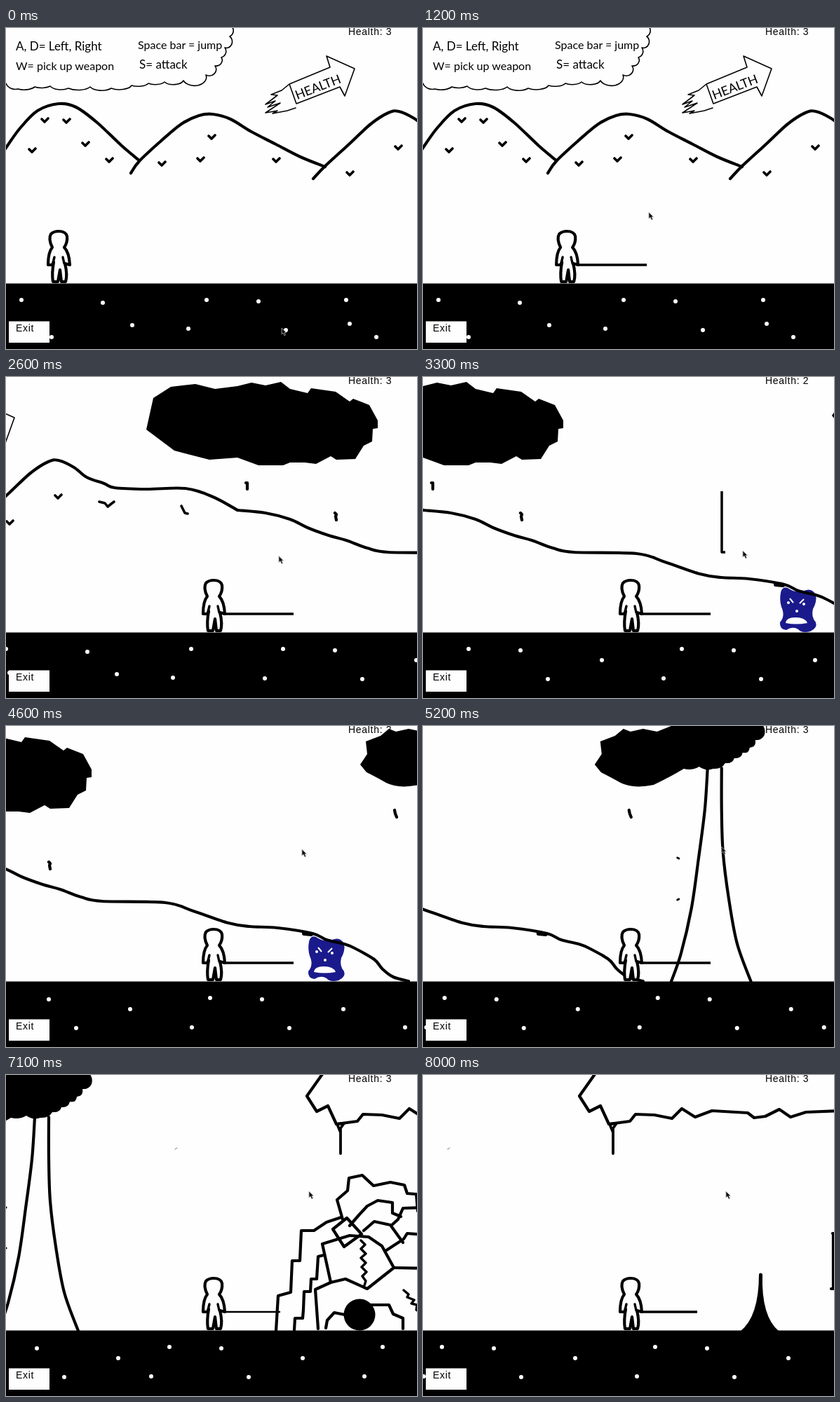
An HTML page that plays this animation: 586 by 458 pixels, repeating every 8100 ms.

```html
<!DOCTYPE html>
<html lang="en">
<head>
<meta charset="utf-8">
<title>Side-scrolling game</title>
<style>
html, body { margin: 0; width: 100%; height: 100%; overflow: hidden; background: #fefefe; }
svg { display: block; width: 586px; height: 458px; }
.ink { fill: none; stroke: #000; stroke-width: 4.2; stroke-linecap: round; stroke-linejoin: round; }
.thin { stroke-width: 1.6; }
.fill { fill: #000; }
.hand { font: 17px Lato, "Open Sans", sans-serif; }
.ui { font: 14px "Liberation Sans", Arial, sans-serif; letter-spacing: .7px; white-space: pre; }
</style>
</head>
<body>
<svg viewBox="0 0 586 458">
  <g id="world">
    <!-- start: hills and instructions -->
    <g class="ink">
      <path class="thin" d="M0 79a14 12 0 0 0 17 8a18 9 0 0 0 24-3a16 7 0 0 0 22-1a17 9 0 0 0 26 3a19 8 0 0 0 31-2a18 9 0 0 0 30 2a18 8 0 0 0 29-4a16 7 0 0 0 24-3a15 7 0 0 0 23-2a15 8 0 0 0 27-2a17 12 0 0 0 32-8a10 9 0 0 0 13-13a9 8 0 0 0 9-12a9 9 0 0 0 5-14a8 9 0 0 0 7-16a9 9 0 0 0 3-14"/>
      <path data-curve="-6 180 2 168 20 143 45 118 75 108 100 113 130 135 165 168 190 189"/>
      <path data-curve="178 207 190 190 220 162 250 137 275 125 295 123 320 130 350 148 385 166 420 184 455 198"/>
      <path data-curve="438 215 455 197 490 165 520 137 545 121 560 119 582 129 600 143 625 152 640 158 685 160 741 159 780 171 815 190"/>
      <path id="birds" stroke-width="3.6"/>
      <path d="M618 178l8 2 4 5 5-4 4-3M735 184l5 10 4 1" stroke-width="3.6"/>
      <path class="thin" d="M404 80L462 56 457 40 497 58 483 97 476 84 414 108ZM404 80l-11 9-15 6 9 1-17 13 14-5-11 9 18-6-21 14 17-3-7 4 21-4 12-4"/>
    </g>
    <g class="hand">
      <text x="14" y="32">A, D= Left, Right</text>
      <text x="14" y="60" font-size="16">W= pick up weapon</text>
      <text x="188" y="30" font-size="16">Space bar = jump</text>
      <text x="190" y="58">S= attack</text>
      <text transform="translate(447 90) rotate(-21)" text-anchor="middle" font-size="18">HEALTH</text>
    </g>

    <!-- slope, cloud and blue enemy -->
    <g transform="translate(815)">
      <path class="fill" d="M-120 30L-95 14-60 10-32 17 0 13 20 8 40 12 62 7 75 17 100 23 105 16 140 21 160 35 165 31 188 40 200 62 200 73 193 74 192 92 180 98 168 117 141 118 133 113 112 124 96 122 75 122 65 126 30 126 0 115-40 118-90 105-130 75Z"/>
      <g id="enemy">
        <path d="M510 308Q512 298 520 301 531 309 543 305 555 300 560 311 562 320 556 331 553 342 560 350 563 358 552 363 540 366 535 360 527 355 518 361 508 360 509 350 517 341 511 328 508 318 510 308Z" fill="#1b1a8c"/>
        <path d="M517 351Q518 343 531 343 545 343 548 351Q532 354 517 351Z" fill="#fff"/>
        <path d="M523 316l5 6M543 317l-6 6" stroke="#fff" stroke-width="2"/>
        <g fill="#fff"><circle cx="521" cy="322" r="2"/><circle cx="543" cy="324" r="2"/><circle cx="533" cy="334" r="2"/></g>
      </g>
      <g class="ink">
        <path data-curve="0 190 40 194 75 203 100 215 130 226 155 233 185 244 215 250 305 252 345 264 395 281 425 286 465 288 515 296 535 305 560 311 575 317 603 333 615 347 630 358 652 364"/>
        <path d="M503 296l10 1" stroke-width="6"/>
        <path d="M12 151l2 0v9M139 194l2 2-1 3 1 5M632 120l1 5 2 5"/>
        <path id="pickup" d="M426 163V250h5" stroke-width="3.5" stroke-linecap="butt"/>
      </g>
    </g>

    <!-- tree, branch and rock pile -->
    <g transform="translate(1587)">
      <path class="fill" d="M-189 55L-179 40-181 22-160 14-148 4-138 8-120 4-100 8-70-4 48-4Q56 3 53 13 49 21 40 20 42 30 32 31 31 40 22 38 20 47 10 46 8 54-3 53-8 62-20 61-30 65-40 58-50 64-62 61-80 72-105 84-134 90-152 81-164 74-180 66Z"/>
      <g class="ink">
        <path data-curve="-28 60 -32 120 -41 190 -51 260 -66 325 -80 365"/>
        <path data-curve="-8 60 -8 120 -6 180 2 245 14 310 34 365"/>
        <path d="M-71 188l2 1M-71 248l2-1" stroke-width="3"/>
        <path d="M172 106l3-2" stroke="#777" stroke-width="1"/>
        <path d="M384-4L360 30 374 52 390 44 402 70 432 66 440 56 467 57 492 62 506 48 525 60 549 51 600 54 609 61 625 59 645 49 661 60 683 53 760 50"/>
        <path d="M403 70l10-1-5 7V112M403 70l5 12" stroke-width="3.8"/>
      </g>
      <g id="rocks" class="ink" stroke-width="4">
        <path d="M316 365L319 315 337 310 339 265 350 265 352 222 370 222 388 210 409 203"/>
        <path d="M411 206L403 178 418 165 420 147 439 143 455 158 479 153 499 157 503 169 516 170 518 194"/>
        <path d="M397 220L417 204 438 227 413 245Z"/>
        <path d="M421 215L434 200 446 187 461 179 482 182 482 197 494 202"/>
        <path d="M441 222L456 209 479 214 497 239M480 215L490 206 497 190 535 189 538 205 549 210 547 245 541 249 536 244"/>
        <path d="M472 251L498 234 503 226 529 228 533 240 554 252 556 309"/>
        <path d="M382 241L421 229 448 231 467 244 484 275 446 305 415 291 394 296Z"/>
        <path d="M484 275L536 276 568 305 569 365M394 296L372 306 376 362"/>
        <path d="M384 257L376 259 374 291 366 291 365 309 356 309 355 335 354 347 343 347 342 364"/>
        <path d="M387 361L389 350 399 339 434 346V361M428 344L433 328 477 328 483 341 497 347V362"/>
        <path d="M437 236l6 6-6 6 7 7-7 6 7 7-6 6 7 7-6 6 5 7-2 6M498 307l7 6-2 4 10 4-4 5 8 2-1 7 7 5" stroke-width="3.4"/>
      </g>
      <circle id="ball" cx="435" r="22.5"/>
    </g>

    <!-- spike and next weapon -->
    <g transform="translate(1724)">
      <path class="fill" d="M452 366Q479 345 479 284Q481 281 484 284 482 345 508 366Z"/>
      <path class="ink" d="M586 226H584M585 226V305M582 305H592" stroke-width="3.5"/>
    </g>
  </g>

  <path d="M0 364.5H586V458H0Z"/>
  <g id="dots" fill="#fefefe"></g>

  <g id="player" class="ink">
    <path d="M66 313Q60 301 64 294 68 290 75 290 85 290 87 297 88 306 83 313Q90 320 91 338L84 336Q88 352 85 362L79 362 77 345 74 362 67 362Q65 350 68 334L66 338 60 338Q60 320 66 313Z" fill="#fefefe"/>
    <path d="M67 335L69 327M83 336L81 327" stroke-width="3.4"/>
    <path id="weapon" stroke-linecap="butt"/>
  </g>

  <text id="health" class="ui" x="488" y="10"></text>
  <path d="M4 418.500H62V449H4Z" fill="#fefefe"/>
  <text class="ui" x="14" y="433">Exit</text>
  <path id="cursor" d="M0 0V9L2 7 4 11 5.500 10 4 6.500H6.500Z" fill="#111" stroke="#aaa" stroke-width=".8"/>
</svg>
<script>
const $ = id => document.getElementById(id);
const LOOP = 8100, STEP = 100, EDGE = 221;

// Smooth line through points
function curve(p) {
  const at = i => p[Math.max(0, Math.min(p.length - 1, i))];
  let d = `M${p[0]}`;
  for (let i = 0; i < p.length - 1; i++) {
    const [a, b, c, e] = [at(i - 1), at(i), at(i + 1), at(i + 2)];
    d += `C${b.map((v, k) => v + (c[k] - a[k]) / 6)} ${c.map((v, k) => v - (e[k] - b[k]) / 6)} ${c}`;
  }
  return d;
}
for (const el of document.querySelectorAll('[data-curve]')) {
  const n = el.dataset.curve.split(' ').map(Number), pts = [];
  for (let i = 0; i < n.length; i += 2) pts.push([n[i], n[i + 1]]);
  el.setAttribute('d', curve(pts));
}

const birds = [[55, 132], [86, 133], [37, 175], [113, 166], [147, 189], [222, 194],
  [277, 188], [293, 156], [385, 189], [490, 208], [559, 171]];
$('birds').setAttribute('d', birds.map(([x, y]) => `M${x - 4} ${y - 2}l4 4 5-5`).join(''));

// Repeating pebbles: start, end, first tile, tile width, spots
const pebbles = [[0, 388], [74, 390], [113, 431], [190, 404], [278, 430]];
const strips = [
  [0, 770, 0, 463, [[22, 388], [27, 422], [65, 441], [138, 392], [180, 424], [260, 429], [286, 388], [360, 390], [399, 431]]],
  [770, 1702, 576, 304, pebbles],
  [1702, 2400, 1447, 304, pebbles]
];
let dots = '';
for (const [lo, hi, from, width, spots] of strips)
  for (let x0 = from; x0 < hi; x0 += width)
    for (const [x, y] of spots)
      if (x0 + x >= lo && x0 + x < hi) dots += `<circle cx="${x0 + x}" cy="${y}" r="3"/>`;
$('dots').innerHTML = dots;

// Linear interpolation over [time, ...values]
function track(keys, t) {
  let i = 0;
  while (i < keys.length - 2 && t >= keys[i + 1][0]) i++;
  const a = keys[i], b = keys[i + 1];
  const k = Math.max(0, Math.min(1, (t - a[0]) / (b[0] - a[0])));
  return a.slice(1).map((v, j) => v + (b[j + 1] - v) * k);
}
const walk = [[0, 0], [600, 0], [900, 52], [1000, 95], [1100, 95], [1900, 376], [3300, 1036],
  [4600, 1114], [6200, 1808], [7100, 1739], [7400, 1739], [8000, 1945]];
const mouse = [[0, 393, 428], [900, 322, 263], [1900, 322, 263], [3300, 456, 248],
  [4600, 422, 176], [6200, 432, 166], [8100, 432, 166]];
const show = (id, on) => $(id).setAttribute('visibility', on ? 'visible' : 'hidden');
const move = (id, x, y = 0) => $(id).setAttribute('transform', `translate(${x} ${y})`);

function draw(t) {
  const [pos] = track(walk, t);
  const cam = Math.max(0, pos - EDGE);
  move('world', -cam);
  move('dots', -cam);
  move('player', Math.min(EDGE, pos));
  move('cursor', ...track(mouse, t));

  const short = t >= 5300;
  show('weapon', t >= 1000);
  $('weapon').setAttribute('d', `M89 338H${short ? 170 : 189}`);
  $('weapon').setAttribute('style', `stroke-width:${short && t < 7400 ? 2.5 : 3.5}`);
  $('health').textContent = 'Health: ' + (t >= 3000 && t < 5200 ? 2 : 3);

  show('pickup', t < 3900);
  show('enemy', t < 4800);
  show('rocks', t < 7400);
  show('ball', t >= 6100 && t < 7300);
  $('ball').setAttribute('cy', track([[6200, 208], [7100, 342]], t)[0]);
}

const start = performance.now();
function tick() {
  const t = (performance.now() - start) % LOOP;
  draw(Math.floor(t / STEP) * STEP);
  requestAnimationFrame(tick);
}
tick();
</script>
</body>
</html>
```
